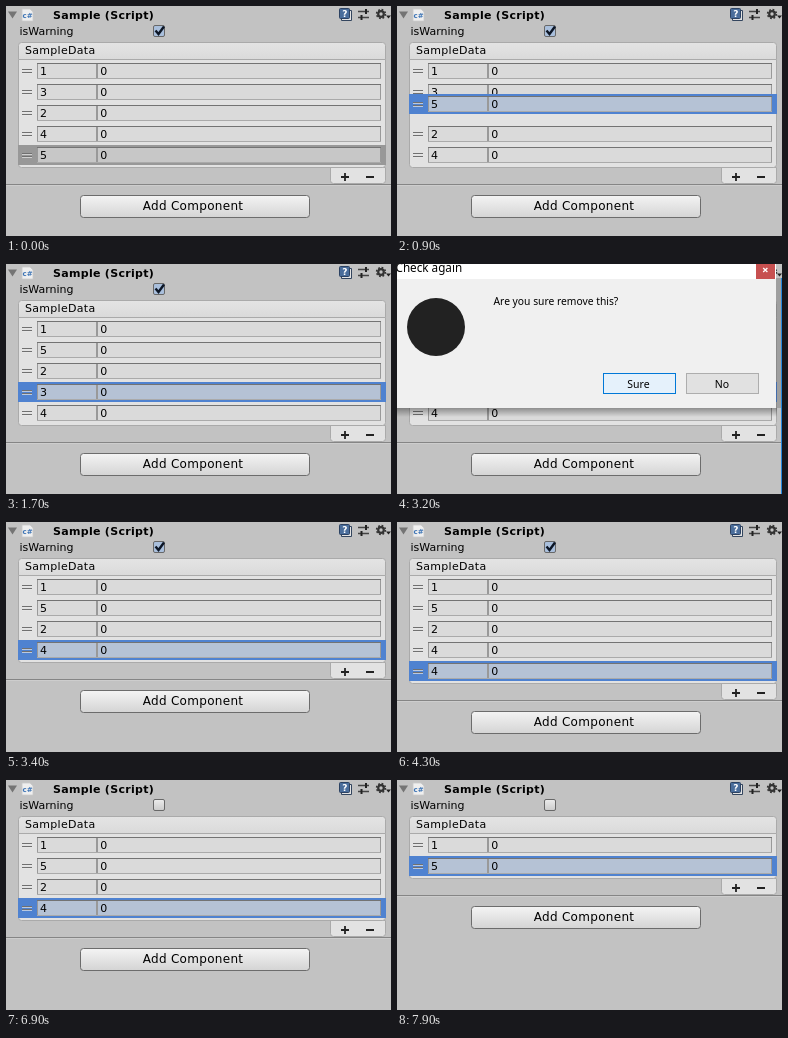
An HTML page for the animation above (8000 ms loop, 385x230 px).

```html
<!DOCTYPE html>
<html lang="en">
<head>
<meta charset="utf-8">
<title>Reorderable list</title>
<style>
  html, body { margin: 0; width: 100%; height: 100%; overflow: hidden; background: #c2c2c2; }
  svg { display: block; }
  text { font: 11px "DejaVu Sans", sans-serif; letter-spacing: .3px; fill: #000; white-space: pre; }
  .crisp { shape-rendering: crispEdges; }
  .mid { text-anchor: middle; }
  #dialog text { font-family: "Noto Sans", "Open Sans", sans-serif; letter-spacing: 0; }
</style>
</head>
<body>
<svg width="385" height="230" viewBox="0 0 385 230">
  <defs>
    <linearGradient id="btn" x2="0" y2="1">
      <stop stop-color="#f4f4f4"/><stop offset="1" stop-color="#d4d4d4"/>
    </linearGradient>
    <linearGradient id="head" x2="0" y2="1">
      <stop stop-color="#e4e4e4"/><stop offset="1" stop-color="#dadada"/>
    </linearGradient>
    <linearGradient id="toggle" x2="0" y2="1">
      <stop stop-color="#ececec"/><stop offset="1" stop-color="#cbcbcb"/>
    </linearGradient>
    <linearGradient id="shade" x2="0" y2="1">
      <stop stop-color="#000" stop-opacity=".35"/><stop offset="1" stop-color="#000" stop-opacity="0"/>
    </linearGradient>
  </defs>
  <rect width="385" height="230" fill="#c2c2c2"/>

  <!-- component header -->
  <path d="M2 5.5h9l-4.5 7z" fill="#747474"/>
  <path d="M16 3h8l3 3v9h-11z" fill="#efefef" stroke="#c9c9c9" stroke-width=".8"/>
  <text x="21.5" y="12" class="mid" style="font-size:7px;font-weight:bold;letter-spacing:0;fill:#3d74b5">c#</text>
  <text x="47" y="13" style="font-weight:bold">Sample (Script)</text>
  <path d="M335.5 4.5h10v10h-10z" fill="#e4e4e4" stroke="#33455e"/>
  <rect x="333.5" y="2.5" width="10" height="10" rx="1" fill="#4a6d9b" stroke="#2c4262"/>
  <text x="338.8" y="11" class="mid" style="font-size:9px;font-weight:bold;letter-spacing:0;fill:#fff">?</text>
  <path d="M352 5.5h11M352 11.5h11" stroke="#444" stroke-width="1.4"/>
  <path d="M360 3v5M355.5 9v5" stroke="#222" stroke-width="2"/>
  <circle cx="375" cy="8" r="2.8" fill="none" stroke="#333" stroke-width="2.2"/>
  <circle cx="375" cy="8" r="4.4" fill="none" stroke="#333" stroke-width="1.6" stroke-dasharray="1.73"/>
  <path d="M380 9.5h5l-2.5 3z" fill="#222"/>

  <!-- toggle -->
  <text id="label" x="13.5" y="29" style="letter-spacing:0">isWarning</text>
  <rect id="box" x="147.5" y="19.5" width="11" height="11" rx="1.5" stroke="#686868"/>
  <path id="tick" d="M149.5 24.5l3 3.5 5.5-7.5" fill="none" stroke="#0c1626" stroke-width="2.4"/>

  <!-- list -->
  <path id="foot" fill="#e2e2e2" stroke="#aaa"/>
  <path id="body" fill="#e2e2e2" stroke="#aaa"/>
  <path d="M12.5 53.5v-14q0-3 3-3h361q3 0 3 3v14z" fill="url(#head)" stroke="#aaa"/>
  <text x="19" y="48">SampleData</text>
  <g id="rows"></g>

  <!-- everything below the list -->
  <g id="below">
    <path d="M335 98h8M339 94v8M360 98h8" stroke="#222" stroke-width="1.8"/>
    <g class="crisp">
      <rect y="105" width="385" height="1" fill="#858585"/>
      <rect y="106" width="385" height="1" fill="#cdcdcd"/>
    </g>
    <rect x="74.5" y="116.5" width="229" height="22" rx="3" fill="url(#btn)" stroke="#6c6c6c"/>
    <text x="187" y="131" class="mid" style="font-size:12px">Add Component</text>
  </g>

  <g id="dialog">
    <rect y="144" width="380" height="9" fill="url(#shade)"/>
    <g class="crisp">
      <rect x="379" y="14" width="5" height="130" fill="#000" opacity=".18"/>
      <rect x="384" y="14" width="1" height="216" fill="#2387dc"/>
      <rect width="379" height="144" fill="#f0f0f0"/>
      <rect width="379" height="15" fill="#fff"/>
      <rect x="359" width="19" height="15" fill="#c75050"/>
      <rect x="206" y="109" width="73" height="21" fill="#0078d7"/>
      <rect x="208" y="111" width="69" height="17" fill="#e1e1e1"/>
      <rect id="hover" x="207" y="110" width="71" height="19" fill="#e5f1fb"/>
      <rect x="289.5" y="109.5" width="72" height="20" fill="#e1e1e1" stroke="#adadad"/>
    </g>
    <path d="M366.2 4l4.2 4M370.4 4l-4.2 4" stroke="#fff" stroke-width="1.3"/>
    <text x="-1.5" y="8" style="font-size:11.7px">Check again</text>
    <circle cx="39" cy="63" r="29" fill="#222"/>
    <text x="96.5" y="41" style="font-size:10.3px">Are you sure remove this?</text>
    <text x="241.5" y="124" class="mid" style="font-size:10.5px">Sure</text>
    <text x="325" y="124" class="mid" style="font-size:10.5px">No</text>
  </g>
</svg>
<script>
const LOOP = 8000, ROW = 21, TOP = 65;
const $ = id => document.getElementById(id);

// Each step patches the state left by the one before it.
const steps = [
  [0, { items: '13245', sel: 4, active: false, dragY: 0, dialog: 0, hover: 0, on: true, focus: false }],
  [700, { active: true }],
  [800, { dragY: 131 }],
  [900, { dragY: 98 }],
  [1000, { items: '15324', sel: 1, dragY: 0 }],
  [1400, { sel: 2 }],
  [1500, { dragY: 119 }],
  [1600, { dragY: 138 }],
  [1700, { items: '15234', sel: 3, dragY: 0 }],
  [2600, { dialog: .55 }],
  [2700, { dialog: 1 }],
  [3000, { hover: .33 }],
  [3100, { hover: .67 }],
  [3200, { hover: 1 }],
  [3400, { items: '1524', dialog: 0, hover: 0 }],
  [4300, { items: '15244', sel: 4 }],
  [5200, { active: false, focus: true }],
  [5300, { on: false }],
  [5900, { active: true, focus: false }],
  [6900, { items: '1524', sel: 3 }],
  [7600, { items: '152', sel: 2 }],
  [7900, { items: '15', sel: 1 }]
];
const states = [];
for (const [at, patch] of steps) {
  const last = states[states.length - 1];
  states.push({ ...last, ...patch, at });
}

const field = (x, w) => `
  <rect x="${x}" y="-8" width="${w}" height="16" fill="rgba(215,215,215,.75)"/>
  <path d="M${x + .5} -7v15M${x + w - .5} -7v15" stroke="#999"/>
  <path d="M${x} 7.5h${w}" stroke="#aaa"/>
  <path d="M${x} -7.5h${w}" stroke="#737373"/>`;

function rowMarkup(value, y, fill) {
  return `<g transform="translate(0 ${y})">
    <g class="crisp">
      <rect x="12" y="-10" width="368" height="20" fill="${fill}"/>
      <path d="M16 -1.5h10M16 1.5h10" stroke="#707070"/>
      <path d="M16 -.5h10M16 2.5h10" stroke="#e8e8e8" opacity=".7"/>
      ${field(31, 60)}${field(91, 284)}
    </g>
    <text x="34" y="4">${value}</text><text x="94.3" y="4">0</text>
  </g>`;
}

function rowsMarkup({ items, sel, active, dragY }) {
  const fill = active ? '#4f82d0' : '#989898';
  const slot = dragY ? Math.round((dragY - TOP) / ROW) : sel;
  const rest = [...items];
  const [picked] = rest.splice(sel, 1);
  const others = rest.map((v, i) => rowMarkup(v, TOP + ROW * (i < slot ? i : i + 1), 'none'));
  return others.join('') + rowMarkup(picked, dragY || TOP + ROW * sel, fill);
}

function render(s) {
  const grow = ROW * s.items.length, end = 56.5 + grow;
  $('body').setAttribute('d', `M12.5 53.5V${end - 3}q0 3 3 3h361q3 0 3-3V53.5z`);
  $('foot').setAttribute('d', `M324.5 ${end}v13q0 3 3 3h49q3 0 3-3v-13z`);
  $('below').setAttribute('transform', `translate(0 ${grow - 32})`);
  $('rows').innerHTML = rowsMarkup(s);
  $('label').style.fill = s.focus ? '#003c88' : '';
  $('box').style.stroke = s.focus ? '#4f7fc0' : '';
  $('box').style.fill = s.on ? '#a9bfdc' : 'url(#toggle)';
  $('tick').style.opacity = s.on ? 1 : 0;
  $('dialog').style.opacity = s.dialog;
  $('hover').style.opacity = s.hover;
}

let start, shown;
function frame(now) {
  start ??= now;
  const t = (now - start) % LOOP;
  const state = states.findLast(s => s.at <= t) || states[0];
  if (state !== shown) render(shown = state);
  requestAnimationFrame(frame);
}
render(shown = states[0]);
requestAnimationFrame(frame);
</script>
</body>
</html>
```
